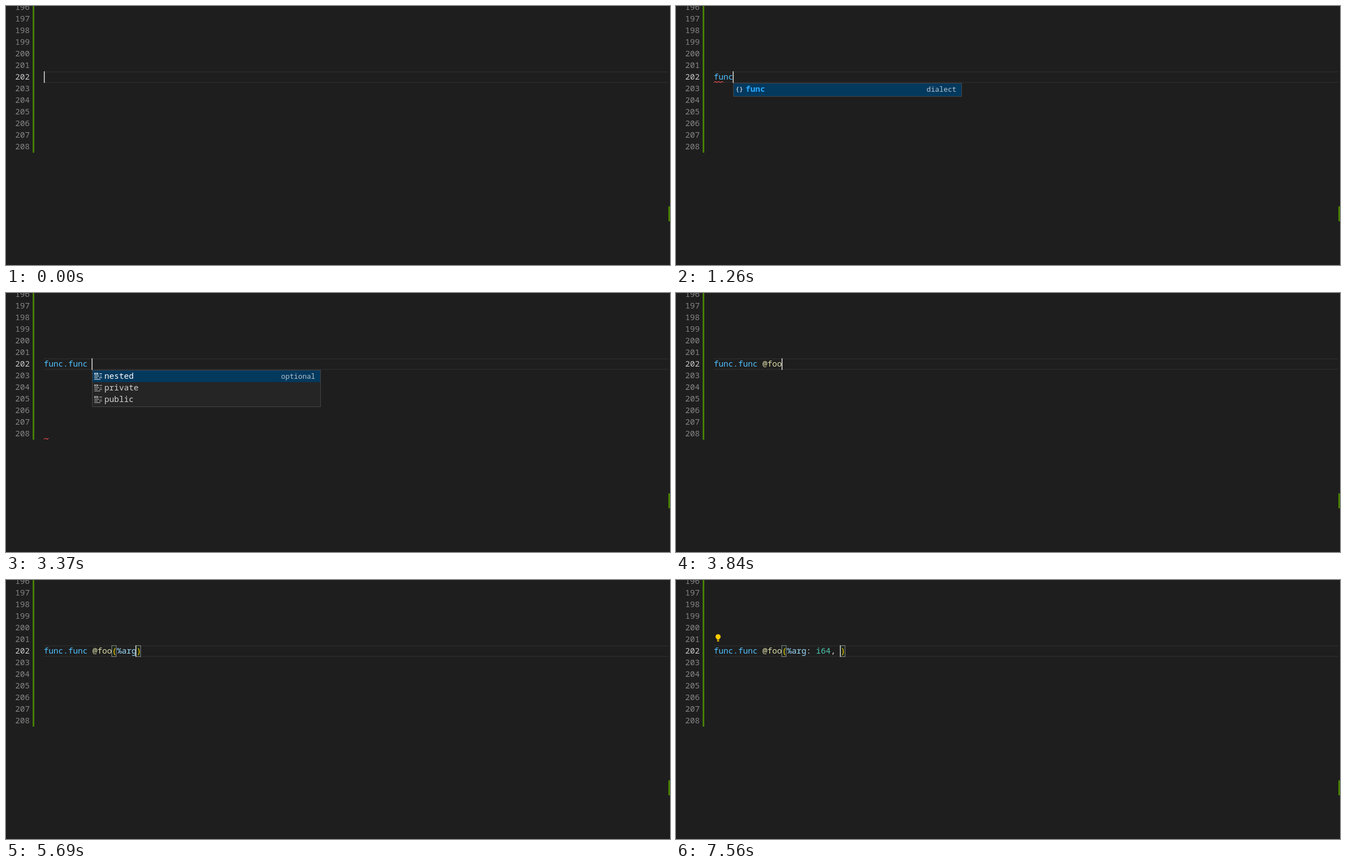
These frames come from a looping animation (1196x468 px, 8000 ms). An HTML page with a canvas:

```html
<!DOCTYPE html>
<html lang="en">
<head>
<meta charset="utf-8">
<title>Editor completion</title>
<style>
  html, body { margin: 0; width: 100%; height: 100%; overflow: hidden; background: #1e1e1e; }
  canvas { display: block; }
</style>
</head>
<body>
<canvas id="stage" width="1196" height="468"></canvas>
<script>
const ctx = document.getElementById('stage').getContext('2d');
const LOOP = 8000, LEFT = 68, CHAR = 8.777, ROW = 21, LINE_TOP = 118, BASELINE = 15;
const POPUP_TOP = 139, POPUP_WIDTH = 412, POPUP_MAX = 221;
const FAMILY = '"Noto Sans Mono", "DejaVu Sans Mono", monospace';
const FONT = `14.63px ${FAMILY}`, BOLD = `bold 14.63px ${FAMILY}`, SMALL = `12.8px ${FAMILY}`;

const colX = col => LEFT + col * CHAR;
const active = ([from, to], t) => t >= from && t < to;

// Time of each keystroke and the text before the caret after it.
const FULL = 'func.func @foo(%arg: i64, ';
const KEY_TIMES = [930, 1130, 1190, 1260, 1390, 1590, 1790, 1860, 1990, 2390, 3440, 3640, 3770,
  3840, 4300, 4890, 5160, 5360, 5690, 6370, 6500, 6770, 7030, 7170, 7430, 7560];
const CARET_OFF = [[270, 600], [2850, 3370], [4830, 4890], [6170, 6370]];

const words = s => s.split(' ');
const dialects = { icon: braces, detail: 'dialect', scroll: true,
  items: words('acc affine amdgpu amx arith arm_neon arm_sve async bufferization builtin cf') };
const funcDialect = { icon: braces, detail: 'dialect', items: ['func'] };
const ops = { icon: cube, detail: 'operation',
  items: words('call call_indirect constant func return') };
const funcOp = { icon: cube, detail: 'operation', items: ['func'] };
const visibility = { icon: keyword, detail: 'optional', items: words('nested private public') };
const types = { icon: cube, scroll: true,
  items: words('bf16 complex f128 f16 f32 f64 f80 i<N> index memref none') };
const iTypes = { icon: cube, items: words('i<N> index irdl') };

// start, end, column, list, matched letters
const POPUPS = [
  [670, 930, 0, dialects, 0],
  [930, 1130, 1, funcDialect, 1],
  [1130, 1190, 2, funcDialect, 2],
  [1190, 1260, 3, funcDialect, 3],
  [1260, 1390, 4, funcDialect, 4],
  [1460, 1590, 5, ops, 0],
  [1590, 1790, 6, funcOp, 1],
  [1790, 1860, 7, funcOp, 2],
  [1860, 1990, 8, funcOp, 3],
  [1990, 2390, 9, funcOp, 4],
  [2390, 3440, 10, visibility, 0],
  [3970, 4300, 14, types, 0],
  [4300, 4960, 15, types, 0],
  [4960, 5160, 16, types, 0],
  [6560, 6770, 21, types, 0],
  [6770, 7030, 22, iTypes, 1],
];

// start, end, columns, rows below the current line
const SQUIGGLES = [
  [1190, 1460, 2, 0], [1460, 1590, 4, 0], [1590, 2190, 6, 0],
  [2190, 3840, 1, 6], [4370, 4960, 9, 0], [7100, 7560, 9, 0],
];

function rect(x, y, w, h, color) {
  ctx.fillStyle = color;
  ctx.fillRect(x, y, w, h);
}

function text(s, x, y, color, font = FONT) {
  ctx.font = font;
  ctx.fillStyle = color;
  ctx.fillText(s, x, y);
}

function polyline(points) {
  ctx.beginPath();
  points.forEach(([x, y]) => ctx.lineTo(x, y));
  ctx.stroke();
}

function braces(selected) {
  text('{}', 1.2, 11.5, selected ? '#fff' : '#ccc', `11.5px ${FAMILY}`);
}

function cube(selected) {
  ctx.strokeStyle = selected ? '#fff' : '#75beff';
  ctx.lineWidth = 1.1;
  polyline([[1.5, 6.3], [9, 2.5], [14.5, 5.2], [14.5, 10], [7, 13.7], [1.5, 11],
    [1.5, 6.3], [7, 8.8], [14.5, 5.2]]);
  polyline([[7, 8.8], [7, 13.7]]);
}

function keyword(selected) {
  const color = selected ? '#fff' : '#ccc';
  ctx.strokeStyle = color;
  ctx.lineWidth = 1;
  ctx.strokeRect(1.5, 2.5, 6, 2);
  [[10, 3, 5], [1, 7, 9], [12, 7, 2], [1, 10, 6], [10, 10, 5], [1, 13, 11]]
    .forEach(([x, y, w]) => rect(x, y, w, 1, color));
}

function drawGutter() {
  for (let n = 196; n <= 208; n++) {
    const y = LINE_TOP + (n - 202) * ROW + BASELINE;
    text(n, 16.5, y, n === 202 ? '#c6c6c6' : '#858585');
  }
  rect(48, 0, 3, 265, '#487e02');
  rect(1193, 362, 3, 27, '#487e02');
  rect(LEFT, LINE_TOP, 1125, 2, '#282828');
  rect(LEFT, LINE_TOP + 19, 1125, 2, '#282828');
}

function tokenColor(token) {
  if (token.startsWith('func')) return '#4fc1ff';
  if (token[0] === '@') return '#dcdcaa';
  if (token[0] === '%') return '#9cdcfe';
  if (token === 'i64') return '#4ec9b0';
  if (/[()]/.test(token)) return '#ffd700';
  return /^f/.test(token) ? '#4fc1ff' : '#d4d4d4';
}

function drawCode(before) {
  const open = before.indexOf('(');
  const code = open < 0 ? before : before + ')';
  if (open >= 0) {
    for (const col of [open, before.length]) {
      const x = Math.floor(colX(col)) + 0.5;
      ctx.fillStyle = 'rgba(0, 100, 0, .1)';
      ctx.fillRect(x, LINE_TOP, 8, ROW);
      ctx.strokeStyle = '#888';
      ctx.lineWidth = 1;
      ctx.strokeRect(x, LINE_TOP + 0.5, 8, ROW - 1);
    }
  }
  for (const match of code.matchAll(/[@%]?[\w.]+|[^\s\w]/g)) {
    text(match[0], colX(match.index), LINE_TOP + BASELINE, tokenColor(match[0]));
  }
}

function drawSquiggle(cols, row) {
  const bottom = LINE_TOP + (row + 1) * ROW;
  ctx.save();
  ctx.beginPath();
  ctx.rect(LEFT, bottom - 4, cols * CHAR, 4);
  ctx.clip();
  ctx.strokeStyle = '#f14c4c';
  ctx.lineWidth = 1.1;
  const points = [];
  for (let i = 0; i * 3 <= cols * CHAR + 3; i++) points.push([LEFT + i * 3, bottom - (i % 2 ? 2.7 : 0.7)]);
  polyline(points);
  ctx.restore();
}

function drawPopup(col, list, matched) {
  const x = Math.floor(colX(col)), count = list.items.length;
  const height = Math.min(count * ROW + 4, POPUP_MAX);
  rect(x, POPUP_TOP, POPUP_WIDTH, height, '#454545');
  ctx.save();
  ctx.beginPath();
  ctx.rect(x + 1, POPUP_TOP + 1, POPUP_WIDTH - 2, height - 2);
  ctx.clip();
  rect(x, POPUP_TOP, POPUP_WIDTH, height, '#252526');
  rect(x, POPUP_TOP, POPUP_WIDTH, count === 1 ? height : ROW + 1, '#04395e');
  list.items.forEach((item, i) => {
    const top = POPUP_TOP + 1 + i * ROW, selected = i === 0;
    ctx.save();
    ctx.translate(x + 3, top + 2.5);
    list.icon(selected);
    ctx.restore();
    const hits = item[0] === 'f' || item[0] === 'i' ? matched : 0;
    const labelX = x + 22.3, y = top + BASELINE;
    text(item.slice(0, hits), labelX, y, '#2aaaff', BOLD);
    text(item.slice(hits), labelX + hits * CHAR, y, selected ? '#fff' : '#d4d4d4');
    if (selected && list.detail) {
      ctx.textAlign = 'right';
      text(list.detail, x + POPUP_WIDTH - 10, y - 0.5, '#b4c4cf', SMALL);
      ctx.textAlign = 'left';
    }
  });
  if (list.scroll) rect(x + POPUP_WIDTH - 11, POPUP_TOP + 1, 10, 42, 'rgba(121, 121, 121, .4)');
  ctx.restore();
}

function drawBulb() {
  ctx.fillStyle = '#ffcc00';
  ctx.beginPath();
  ctx.arc(75.8, 102.6, 4.6, 0, 2 * Math.PI);
  ctx.fill();
  ctx.fillRect(73.8, 105, 4, 3);
  ctx.fillRect(74, 109, 3.6, 2);
}

function draw(t) {
  rect(0, 0, 1196, 468, '#1e1e1e');
  drawGutter();
  const typed = KEY_TIMES.filter(time => time <= t).length;
  drawCode(FULL.slice(0, typed));
  for (const s of SQUIGGLES) if (active(s, t)) drawSquiggle(s[2], s[3]);
  if (!CARET_OFF.some(span => active(span, t))) {
    const x = typed ? Math.floor(colX(typed) - 0.8) : LEFT;
    rect(x, LINE_TOP, 2, ROW, '#aeafad');
  }
  if (t >= 6040) drawBulb();
  const popup = POPUPS.find(p => active(p, t));
  if (popup) drawPopup(...popup.slice(2));
}

const start = performance.now();
function tick() {
  draw((performance.now() - start) % LOOP);
  requestAnimationFrame(tick);
}
tick();
</script>
</body>
</html>
```
